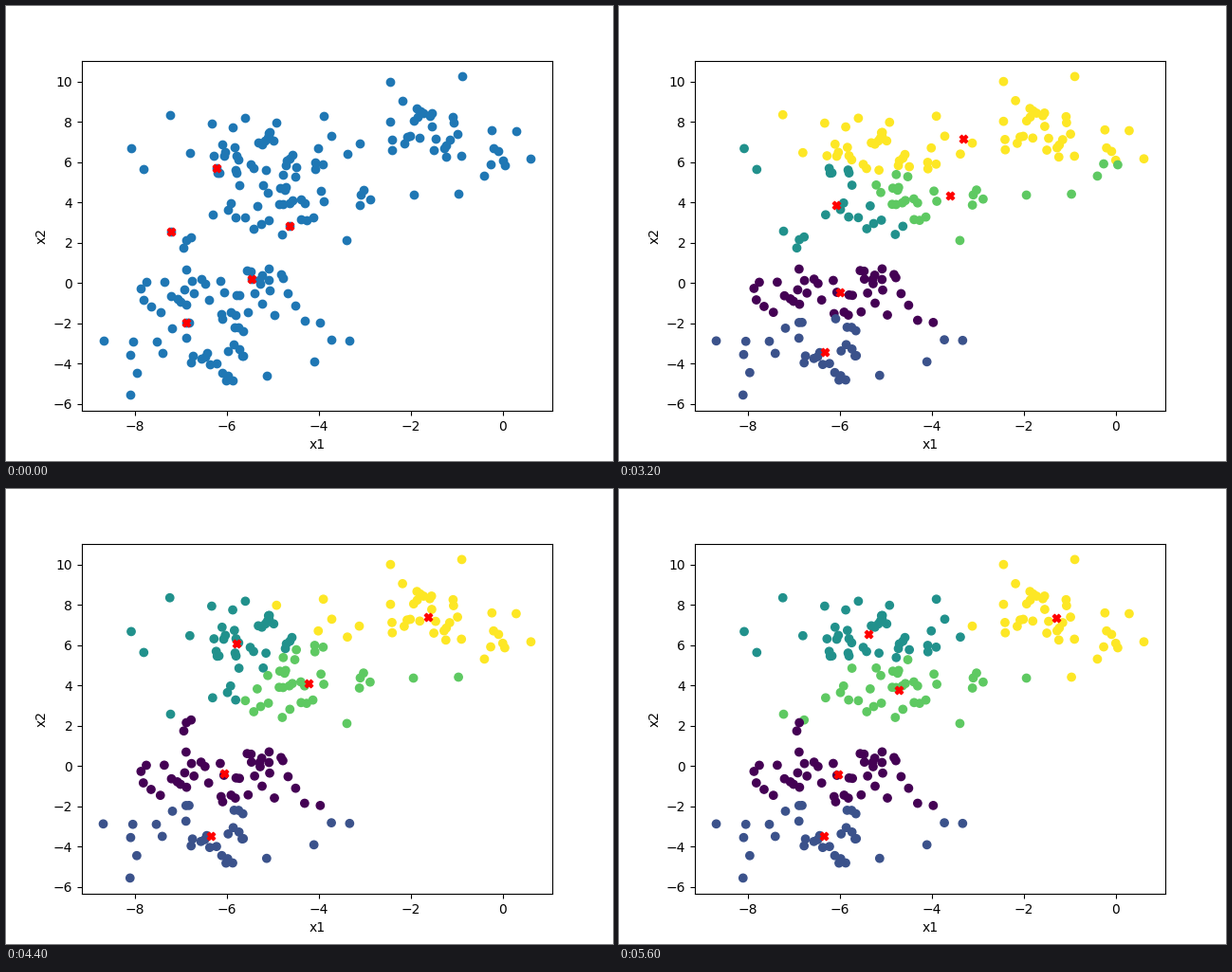
A matplotlib script for the animation above (7200 ms loop, 640 by 480 pixels).

```python
import numpy as np
import matplotlib.pyplot as plt
from matplotlib.animation import FuncAnimation

K, N = 5, 200
HOLD, STEPS, FRAMES = 6, 9, 18


def make_blobs():
    rng = np.random.RandomState(22)
    centers = rng.uniform(-10, 10, (K, 2))
    pts = np.concatenate([rng.normal(c, 1.0, (N // K, 2)) for c in centers])
    order = np.arange(N)
    rng.shuffle(order)
    return pts[order]


def nearest(a, b):
    """Index of the closest row of b for each row of a."""
    return np.linalg.norm(a[:, None] - b[None], axis=2).argmin(axis=1)


def kmeans(pts, centers):
    states = [(None, centers)]
    for _ in range(STEPS):
        labels = nearest(pts, centers)
        centers = np.array([pts[labels == k].mean(axis=0) for k in range(K)])
        states.append((labels, centers))
    return states


points = make_blobs()
seeds = np.array([(-5.46, 0.2), (-6.88, -1.97), (-7.21, 2.56),
                  (-4.63, 2.83), (-6.22, 5.71)])
states = kmeans(points, points[nearest(seeds, points)])

fig, ax = plt.subplots(figsize=(6.4, 4.8), dpi=100)
dots = ax.scatter(*points.T, color="C0")
marks = ax.scatter(*states[0][1].T, color="red", marker="X")
ax.set_xlabel("x1")
ax.set_ylabel("x2")


def update(i):
    step = min(max(i - HOLD + 1, 0), STEPS)
    labels, centers = states[step]
    dots.set_color("C0" if labels is None else plt.cm.viridis(labels / (K - 1)))
    marks.set_offsets(centers)
    return dots, marks


anim = FuncAnimation(fig, update, frames=FRAMES, interval=400,
                     repeat=True, repeat_delay=0)
plt.show()
```
